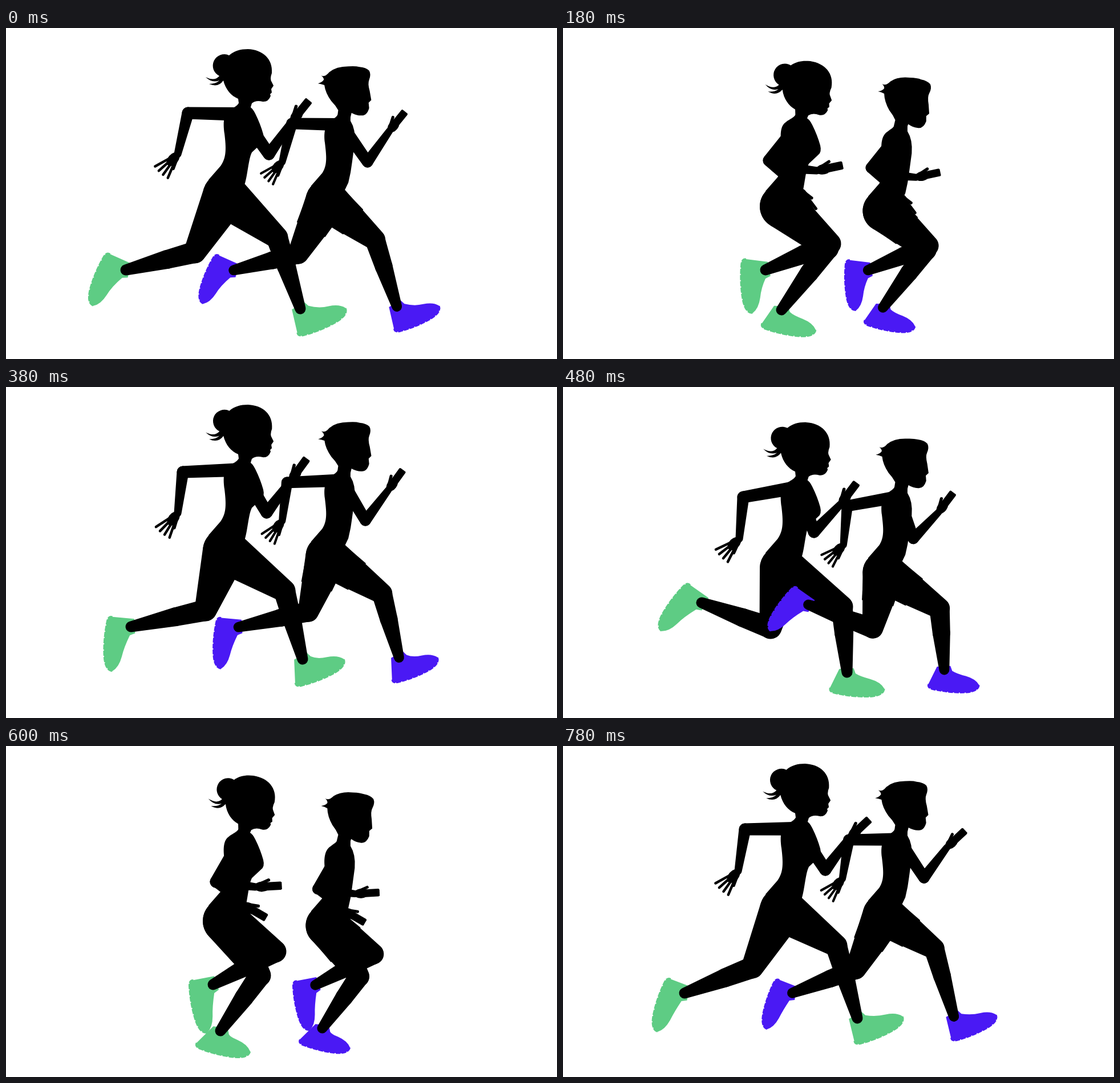
These frames come from a looping animation (966x580 px, 800 ms). An HTML page with a canvas:

```html
<!DOCTYPE html>
<html>
<head>
<meta charset="utf-8">
<title>Two runners</title>
<style>
  html, body { margin: 0; height: 100%; overflow: hidden; background: #fff; }
  canvas { display: block; }
</style>
</head>
<body>
<canvas id="stage" width="966" height="580"></canvas>
<script>
const ctx = document.getElementById('stage').getContext('2d');
const LOOP = 800, STEP = 20, HALF = LOOP / 2, RAD = Math.PI / 180;
const HIP = [384, 293], SHOULDER = [412, 151], NECK = [416, 124];

const wave = (t, peak) => Math.cos(2 * Math.PI * (t - peak) / HALF);
const bounce = t => 6.8 - 22 * wave(t, 320);
const nod = t => 3.3 * (1 - wave(t, 10)) * RAD;

// Poses: middle joint x, y, end joint x, y, then extras.
// Legs add shoe shift x, y and shoe angle; arms add the hand angle.
const TIMES = [0, 180, 260, 380, 480, 600, 780];
const legPoses = [[
  [475, 367, 516, 492, 11, 5, -24],
  [464, 386, 383, 494, 0, 2, 10],
  [374, 396, 287, 492, -2, 0, 25],
  [350, 391, 219, 420, -7, 14, 93],
  [364, 422, 243, 378, -15, 9, 125],
  [472, 360, 363, 418, -2, 16, 78],
  [479, 350, 516, 477, 11, 3, -24]
], [
  [331, 393, 210, 424, -13, 10, 111],
  [468, 378, 355, 424, -5, 9, 86],
  [479, 347, 448, 462, -2, 2, 27],
  [488, 357, 520, 477, 4, 5, -23],
  [489, 385, 498, 500, 2, 2, 4],
  [445, 402, 376, 499, -7, 1, 12],
  [332, 388, 213, 433, -7, 12, 107]
]];
const armPoses = [[
  [319, 149, 301, 221, -42],
  [374, 243, 445, 250, 102],
  [404, 228, 476, 233, 90],
  [457, 220, 500, 163, 144],
  [440, 254, 487, 205, 143],
  [370, 238, 416, 278, 60],
  [319, 146, 307, 219, -42]
], [
  [461, 221, 502, 163, 141],
  [361, 232, 414, 283, 31],
  [335, 189, 384, 247, 55],
  [310, 149, 301, 221, -38],
  [316, 193, 309, 266, -46],
  [368, 238, 437, 247, 93],
  [460, 217, 503, 160, 133]
]];

// Joint positions become angles and lengths, so limbs swing on arcs.
function toTrack(poses, [rx, ry]) {
  return poses.map(([mx, my, ex, ey, ...extra], i) => {
    const y = my - bounce(TIMES[i]) - ry, x = mx - rx;
    return { t: TIMES[i], v: [Math.atan2(x, y), Math.hypot(x, y),
      Math.atan2(ex - mx, ey - my), Math.hypot(ex - mx, ey - my), ...extra] };
  });
}

// Opposite limbs share their movement half a loop apart.
function pairTracks(poses, root) {
  const tracks = poses.map(p => toTrack(p, root));
  return tracks.map((own, i) => {
    const other = tracks[1 - i];
    const borrowed = [other[2], other[4]].map(k => ({ t: (k.t + HALF) % LOOP, v: k.v }));
    return [...own, ...borrowed].sort((a, b) => a.t - b.t);
  });
}
const legs = pairTracks(legPoses, HIP), arms = pairTracks(armPoses, SHOULDER);

// Periodic cubic Hermite interpolation.
function sample(track, t) {
  const n = track.length;
  const key = i => {
    const k = track[(i + n) % n];
    return { t: k.t + LOOP * Math.floor(i / n), v: k.v };
  };
  const i = track.findLastIndex(k => k.t <= t);
  const [a, b, c, d] = [key(i - 1), key(i), key(i + 1), key(i + 2)];
  const h = c.t - b.t, u = (t - b.t) / h;
  return b.v.map((p, j) => {
    const q = c.v[j];
    const m = (q - a.v[j]) / (c.t - a.t) * h, w = (d.v[j] - p) / (d.t - b.t) * h;
    return p + u * (m + u * (3 * (q - p) - 2 * m - w + u * (2 * (p - q) + m + w)));
  });
}

function solve(track, t, root) {
  const [a, l, b, s, ...extra] = sample(track, t);
  const mid = [root[0] + l * Math.sin(a), root[1] + l * Math.cos(a)];
  const end = [mid[0] + s * Math.sin(b), mid[1] + s * Math.cos(b)];
  return { mid, end, extra };
}

const mix = (p, q, u) => [p[0] + (q[0] - p[0]) * u, p[1] + (q[1] - p[1]) * u];

function limb([x1, y1], r1, [x2, y2], r2) {
  const dx = x2 - x1, dy = y2 - y1, a = Math.atan2(dy, dx);
  const b = Math.acos((r1 - r2) / Math.hypot(dx, dy));
  ctx.beginPath();
  ctx.arc(x1, y1, r1, a + b, a - b + 2 * Math.PI);
  ctx.arc(x2, y2, r2, a - b, a + b);
  ctx.fill();
}

function line(x1, y1, x2, y2, width) {
  ctx.lineWidth = width;
  ctx.beginPath();
  ctx.moveTo(x1, y1);
  ctx.lineTo(x2, y2);
  ctx.stroke();
}

function drawShoe({ end, extra: [dx, dy, angle] }, color) {
  const c = Math.cos(angle * RAD), s = Math.sin(angle * RAD);
  const ox = -dx * c - dy * s, oy = dx * s - dy * c;
  const sole = () => {
    ctx.quadraticCurveTo(-32, 34, -22, 36);
    ctx.quadraticCurveTo(10, 41, 40, 38);
    ctx.quadraticCurveTo(65, 35, 65, 22);
  };
  ctx.save();
  ctx.translate(end[0] + dx, end[1] + dy);
  ctx.rotate(angle * RAD);
  ctx.fillStyle = ctx.strokeStyle = color;
  ctx.beginPath();
  ctx.moveTo(ox - 14, oy - 5);
  ctx.lineTo(-30, 27);
  sole();
  ctx.quadraticCurveTo(58, 11, 39, 7);
  ctx.quadraticCurveTo(22, 4, ox + 15, oy + 1);
  ctx.lineTo(ox + 11, oy - 8);
  ctx.fill();
  ctx.lineWidth = 2.5;
  ctx.setLineDash([9, 2]);
  ctx.beginPath();
  ctx.moveTo(-30, 27);
  sole();
  ctx.stroke();
  ctx.restore();
}

function drawLeg({ mid, end }, shorts) {
  limb(HIP, 39, mid, 19.5);
  const calf = mix(mid, end, 0.4);
  limb(mid, 19, calf, 16.5);
  limb(calf, 16.5, end, 9.5);
  if (!shorts) return;
  const hem = mix(HIP, mid, 0.55), len = Math.hypot(mid[0] - HIP[0], mid[1] - HIP[1]);
  const nx = (HIP[1] - mid[1]) / len, ny = (mid[0] - HIP[0]) / len;
  ctx.beginPath();
  for (const [p, r] of [[HIP, 38], [hem, 30], [hem, -30], [HIP, -38]])
    ctx.lineTo(p[0] + nx * r, p[1] + ny * r);
  ctx.fill();
}

function drawArm({ mid, end, extra: [angle] }) {
  limb(SHOULDER, 12, mid, 10.5);
  limb(mid, 10.5, end, 6.5);
  const spread = Math.min(1, Math.max(0, (60 - angle) / 90));
  ctx.save();
  ctx.translate(...end);
  ctx.rotate((90 - angle) * RAD);
  ctx.beginPath();
  ctx.ellipse(12, 0, 14, 9, 0, 0, 7);
  ctx.fill();
  line(6, -4, 24, -11, 5.5);
  for (let i = -1.5; i < 2; i++) {
    const f = 0.22 * i * spread, y = i * (3 + spread);
    line(16, y, 16 + 28 * Math.cos(f), y + 28 * Math.sin(f), 5.5 - spread);
  }
  ctx.restore();
}

const womanHead = new Path2D(`M407 124 C395 119 385 108 381 92 Q372 105 356 98 Q368 98 374 92
  Q361 97 350 86 Q366 94 374 84 A18 18 0 1 1 391 48 C400 40 411 37 424 37
  C450 38 468 54 466 79 Q462 90 466 95 L469 101 L465 107 L466 113 L463 116 L464 119
  Q460 130 450 129 Q438 126 431 132 L428 142 L409 138Z`);
const womanTorso = new Path2D(`M411 118 C411 137 401 137 391 145 C380 152 381 170 383 185
  C386 210 387 227 376 242 L355 266 L384 300 L413 285 L419 272 C424 255 425 230 431 218
  L447 203 Q454 198 451 186 Q446 168 437 150 Q432 140 427 138 L429 118Z`);
const manHead = new Path2D(`M406 124 Q401 115 393 107 Q382 92 380 77 Q375 75 368 74
  Q376 72 379 67 Q379 63 374 59 Q381 63 389 53 Q402 42 425 42 Q438 41 446 43
  Q458 44 464 50 Q468 57 464 67 Q461 74 465 88 L468 105 L463 110 L464 120
  Q460 135 449 134 Q440 134 431 129 L427 146 L404 140Z`);
const manTorso = new Path2D(`M408 118 C408 136 401 137 391 145 C380 152 379 170 381 185
  C384 210 386 227 376 242 L355 266 L384 300 L413 285 L425 260 Q430 240 432 222
  L437 185 Q439 160 429 144 L429 118Z`);

const runners = [
  { x: 0, y: 0, scale: 1, color: '#5ecc84', head: womanHead, torso: womanTorso },
  { x: 202.8, y: 28, scale: 0.935, color: '#4a19f4', head: manHead, torso: manTorso, shorts: true }
];

function drawRunner({ x, y, scale, color, head, torso, shorts }, t) {
  const legPair = legs.map(track => solve(track, t, HIP));
  ctx.save();
  ctx.translate(x, y);
  ctx.scale(scale, scale);
  ctx.translate(0, bounce(t));
  legPair.forEach(leg => drawShoe(leg, color));
  ctx.fillStyle = ctx.strokeStyle = '#000';
  ctx.lineCap = 'round';
  legPair.forEach(leg => drawLeg(leg, shorts));
  ctx.fill(torso);
  arms.forEach(track => drawArm(solve(track, t, SHOULDER)));
  ctx.translate(...NECK);
  ctx.rotate(nod(t));
  ctx.translate(-NECK[0], -NECK[1]);
  ctx.fill(head);
  ctx.restore();
}

function frame() {
  const t = Math.floor(performance.now() % LOOP / STEP) * STEP;
  ctx.clearRect(0, 0, 966, 580);
  runners.forEach(runner => drawRunner(runner, t));
  requestAnimationFrame(frame);
}
frame();
</script>
</body>
</html>
```
